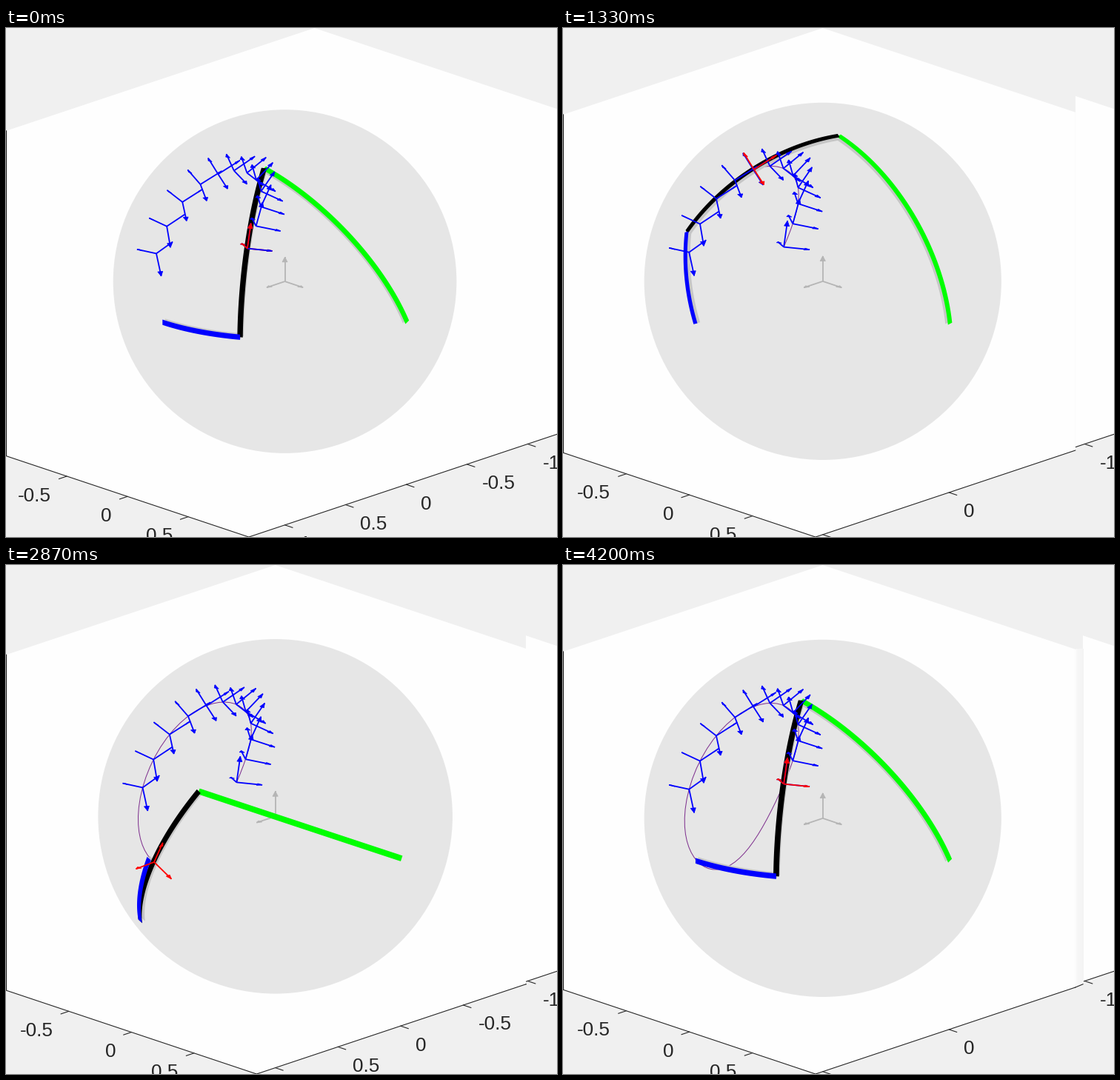
Write a matplotlib script that moves like this. It is 744 by 687 pixels and loops after 4.27 s.

```python
import numpy as np
import matplotlib.pyplot as plt
from matplotlib.animation import FuncAnimation

W, H, DPI = 744, 687, 100
STEPS = 60
BG, WALL, INK = "#f0f0f0", "#fefefe", "#262626"
S2, S3 = np.sqrt(0.5), np.sqrt(2) / 6      # screen slopes of the x and y axes
CZ = np.sqrt(8) / 3
ZLIM = 1.004
ARROW = 0.15
HALF = 0.0165                              # half width of a link
OUTER, INNER = 1.008, 0.987                # radii of a link and its shade

X_AXIS, Y_AXIS, Z_AXIS = np.eye(3)
COUPLER, ROCKER = np.cos(np.radians([60, 75]))

plt.rcParams["font.family"] = "Liberation Sans"
fig = plt.figure(figsize=(W / DPI, H / DPI), dpi=DPI, facecolor=BG)
ax = fig.add_axes([0, 0, 1, 1])


def px(width):
    return width * 72 / DPI


def unit(v):
    return v / np.linalg.norm(v)


def linkage(theta):
    """Moving joints of the spherical four-bar for one crank angle."""
    b = np.array([0.5 * np.cos(theta), np.cos(np.pi / 6), 0.5 * np.sin(theta)])
    c = b @ X_AXIS
    n = np.cross(X_AXIS, b)
    p = (COUPLER - c * ROCKER) / (1 - c * c)
    q = (ROCKER - c * COUPLER) / (1 - c * c)
    s = np.sqrt((1 - p * p - q * q - 2 * p * q * c) / (n @ n))
    return b, p * b + q * X_AXIS + s * n


def coupler_frame(theta):
    b, c = linkage(theta)
    m, t = unit(b + c), unit(c - b)
    return m, (m, t, np.cross(m, t))


class View:
    """Orthographic view fitted to the limits of the plot box."""

    def __init__(self, ymin, ymax):
        self.ymin, self.ymax = ymin, ymax
        span = 2 + ymax - ymin
        self.r = H / (S3 * span + CZ * 2 * ZLIM)
        self.cx = self.r * S2 * (1 + ymax)
        self.cy = self.r * (S3 * (1 - ymin) + CZ * ZLIM)
        self.right = self.r * S2 * span

    def __call__(self, pts):
        x, y, z = np.moveaxis(np.asarray(pts, float), -1, 0)
        return np.stack([self.cx + self.r * S2 * (x - y),
                         self.cy + self.r * (S3 * (x + y) - CZ * z)], -1)

    def right_edge(self):
        return self([(1, self.ymin, ZLIM), (1, self.ymin, -ZLIM)])


angles = 2 * np.pi * np.arange(STEPS + 1) / STEPS
path = np.array([coupler_frame(a)[0] for a in angles])
poses = [coupler_frame(a) for a in np.linspace(0, np.pi, 12)]
reach = max(p[0][1] for p in poses)
ymaxes = (1 + ARROW) * np.maximum(path[:, 1], reach)
first_view = View(-1.244, 1.297)
views = [first_view] + [View(-1, y) for y in ymaxes[1:]]


def line(pts, color, width, z, **kw):
    ax.plot(*np.asarray(pts).T, color=color, lw=px(width), zorder=z, **kw)


def fill(pts, color, z, edge="none"):
    ax.fill(*np.asarray(pts).T, facecolor=color, edgecolor=edge,
            lw=px(0.8) if edge != "none" else 0, zorder=z)


def label(x, y, value, ha):
    ax.text(x, y, f"{value:g}", ha=ha, va="baseline", color=INK,
            fontsize=px(26.3), zorder=5, clip_on=True)


def draw_box(v, yticks, z):
    lo, hi = v.ymin, v.ymax
    corners = v([(-1, hi, ZLIM), (-1, lo, ZLIM), (1, lo, ZLIM),
                 (1, lo, -ZLIM), (1, hi, -ZLIM), (-1, hi, -ZLIM)])
    fill(corners, WALL, z)
    edge = corners[[0, 5, 4, 3]]
    edge[:2, 0] = 0.5
    line(edge, INK, 1.1, z + 0.2)
    tick = np.array([10.4, 3.5])
    for x in (-0.5, 0, 0.5):
        p = v((x, hi, -ZLIM))
        line([p, p + tick * (-1, 1)], INK, 1.1, z + 0.2)
        label(p[0] - 21, p[1] + 33.5, x, "right")
    for y in yticks:
        p = v((1, y, -ZLIM))
        line([p, p + tick], INK, 1.1, z + 0.2)
        label(p[0] + 20, p[1] + 33.5, y, "left")


def draw_strip(v, past, widest):
    """Slices of earlier, wider boxes that stay visible on the right."""
    (top, low), (top2, low2) = v.right_edge(), widest.right_edge()
    fill([top, top2, low2, low], WALL, 4)
    line([low, low2], INK, 1.1, 4.2)
    for w in past:
        if v.right + 0.5 < w.right < widest.right:
            line(w.right_edge(), "#f4f4f4", 0.6, 4.1)


def draw_background(k):
    if k == 0:
        draw_box(first_view, (-1, -0.5, 0, 0.5, 1), 4)
        return
    v, past = views[k], views[1:k + 1]
    widest = max(past, key=lambda w: w.right)
    seam = widest.right

    # right of the seam the opening view remains
    draw_box(first_view, (), 1)
    p = first_view((1, -1, -ZLIM))
    line([p, p + (10.4, 3.5)], INK, 1.1, 1.2)
    label(p[0] + 20, p[1] + 33.5, -1, "left")
    for art in ax.texts[:-1]:
        art.set_visible(False)

    fill([(0, 0), (seam, 0), (seam, H), (0, H)], BG, 3)
    draw_strip(v, past, widest)
    draw_box(v, (0, 1) if v.ymax < 1.1 else (-0.5, 0, 0.5, 1), 4)


def arrow(v, start, vec, color, z):
    tip = start + vec
    flat = np.array([-vec[1], vec[0], 0])
    size = np.linalg.norm(flat)
    # horizontal barbs; an upright arrow takes them along the screen
    side = flat / size if size > 1e-6 else np.array([S2, -S2, 0])
    back, barb = tip - 0.2 * vec, 0.1 * ARROW * side
    line(v([start, tip]), color, 1.8, z, solid_capstyle="butt")
    fill(v([back + barb, tip, back - barb]), color, z, edge=color)


def triad(v, origin, axes, color, z):
    for a in axes:
        arrow(v, origin, ARROW * a, color, z)


def link(v, p, q, color, z):
    ang = np.arccos(p @ q)
    s = np.linspace(0, 1, 40)[:, None]
    arc = (np.sin((1 - s) * ang) * p + np.sin(s * ang) * q) / np.sin(ang)
    off = HALF * unit(np.cross(p, q))
    for radius, col, level in ((INNER, "#c6c6c6", 11), (OUTER, color, z)):
        a = radius * arc
        fill(np.vstack([v(a + off), v(a - off)[::-1]]), col, level)


def update(k):
    ax.clear()
    ax.set(xlim=(0, W), ylim=(H, 0))
    ax.axis("off")
    draw_background(k)

    v = views[k]
    ax.add_patch(plt.Circle((v.cx, v.cy), v.r, fc="#e6e6e6", ec="none", zorder=8))
    triad(v, np.zeros(3), np.eye(3), "#b5b5b5", 9)
    if k:
        line(v(path[:k + 1]), "#7e2f8e", 1, 10)

    b, c = linkage(angles[k])
    link(v, c, X_AXIS, "#00ff00", 12)
    link(v, b, c, "black", 12.2)
    link(v, Y_AXIS, b, "#0000ff", 12.4)

    for origin, axes in poses:
        triad(v, origin, axes, "#0000ff", 14)
    origin, axes = coupler_frame(angles[k])
    triad(v, origin, axes[:2], "#ff0000", 15)
    triad(v, origin, axes[2:], "#ff0000", 15 if k else 13)
    return []


anim = FuncAnimation(fig, update, frames=STEPS + 1, init_func=lambda: [],
                     interval=70, repeat=True, repeat_delay=0, blit=False)
plt.show()
```
